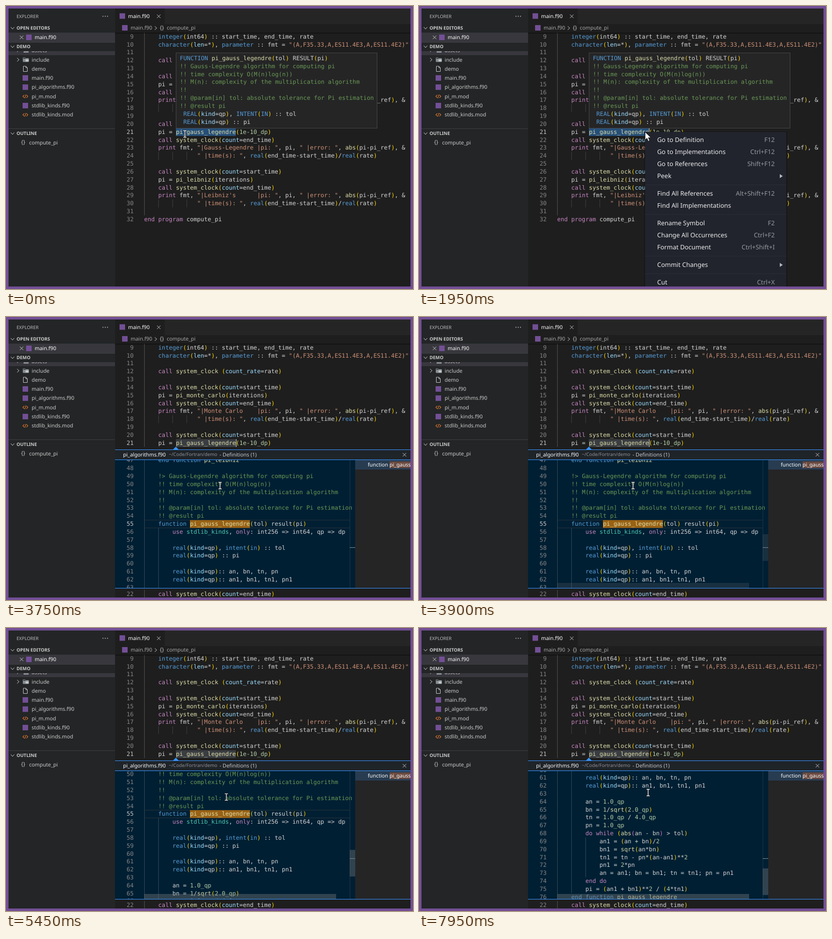
Recreate the animation shown at these times as an HTML page. Size 810 by 564 pixels, loop 8 s.

```html
<!DOCTYPE html>
<html lang="en">
<head>
<meta charset="utf-8">
<title>Peek definition</title>
<style>
html, body { margin: 0; width: 100%; height: 100%; overflow: hidden; background: #1e1e1e; }
svg { display: block; width: 810px; height: 564px; }
text { white-space: pre; text-rendering: geometricPrecision; }
.ui { font: 10.4px "Noto Sans", "Open Sans", sans-serif; }
.bold { font-weight: 700; }
.code { font: 11.67px "DejaVu Sans Mono", monospace; }
</style>
</head>
<body>
<script>
const NS = 'http://www.w3.org/2000/svg';
const LOOP = 8000, LINE = 15.83, COL = 7.026, LEFT = 275, BASE = 3.8;

function add(parent, tag, attrs = {}, content) {
  const el = document.createElementNS(NS, tag);
  for (const k in attrs) el.setAttribute(k, attrs[k]);
  if (content !== undefined) el.textContent = content;
  return parent.appendChild(el);
}
const group = (p, attrs) => add(p, 'g', attrs);
const rect = (p, x, y, width, height, fill, more) => add(p, 'rect', { x, y, width, height, fill, ...more });
const stroke = (p, d, color, width = 1) =>
  add(p, 'path', { d, fill: 'none', stroke: color, 'stroke-width': width });
const label = (p, x, cy, str, fill = '#cccccc', size = 10.4, more = {}) =>
  add(p, 'text', { class: 'ui', x, y: cy + size * 0.355, fill, style: `font-size:${size}px`, ...more }, str);
const cross = (p, x, y) => stroke(p, `M${x - 3.5} ${y - 3.5}l7 7m0-7l-7 7`, '#c5c5c5');
const chevron = (p, x, y, open) =>
  stroke(p, open ? `M${x - 3.5} ${y - 2}l3.5 4l3.5-4` : `M${x - 2} ${y - 3.5}l4 3.5l-4 3.5`, '#c5c5c5');
const show = (el, on) => el.setAttribute('display', on ? 'inline' : 'none');

// Syntax colouring
const TOKENS = [
  [/^!.*/, '#6a9955'],
  [/^"[^"]*"/, '#ce9178'],
  [/^\d[\d.]*(e-?\d+)?(_\w+)?/, '#b5cea8'],
  [/^(call|print|end program|use|only|do while|end do)\b/, '#c586c0'],
  [/^(integer|character|parameter|real|intent|in|end function|function)\b/i, '#569cd6'],
  [/^(kind|count|count_rate|len)(?==)/, '#9cdcfe'],
  [/^stdlib_kinds\b/, '#4ec9b0'],
  [/^(system_clock|pi_gauss_legendre|pi_monte_carlo|pi_leibniz|abs|sqrt)\b/, '#dcdcaa'],
  [/^\w+/, '#d4d4d4'],
  [/^[^\w!"()]+/, '#d4d4d4']
];
const BRACKETS = ['#ffd700', '#da70d6', '#179fff'];

function codeLine(p, x, cy, src) {
  const el = add(p, 'text', { class: 'code', y: cy + BASE });
  const body = src.trimStart();
  el.setAttribute('x', x + (src.length - body.length) * COL);
  let rest = body, depth = 0;
  while (rest) {
    let part, color;
    if (rest[0] === '(' || rest[0] === ')') {
      part = rest[0];
      if (part === ')') depth--;
      color = BRACKETS[Math.max(0, depth) % 3];
      if (part === '(') depth++;
    } else {
      const [re, c] = TOKENS.find(([re]) => re.test(rest));
      part = rest.match(re)[0];
      color = c;
    }
    add(el, 'tspan', { fill: color }, part);
    rest = rest.slice(part.length);
  }
}
function numbered(p, n, cy, src, active) {
  add(p, 'text', { class: 'code', x: 254, y: cy + BASE, 'text-anchor': 'end',
    fill: n === active ? '#c6c6c6' : '#858585' }, n);
  codeLine(p, LEFT, cy, src);
}

const MAIN = `    integer(int64) :: start_time, end_time, rate
    character(len=*), parameter :: fmt = "(A,F35.33,A,ES11.4E3,A,ES11.4E2)"

    call system_clock (count_rate=rate)

    call system_clock(count=start_time)
    pi = pi_monte_carlo(iterations)
    call system_clock(count=end_time)
    print fmt, "|Monte Carlo    |pi: ", pi, " |error: ", abs(pi-pi_ref), &
               " |time(s): ", real(end_time-start_time)/real(rate)

    call system_clock(count=start_time)
    pi = pi_gauss_legendre(1e-10_dp)
    call system_clock(count=end_time)
    print fmt, "|Gauss-Legendre |pi: ", pi, " |error: ", abs(pi-pi_ref), &
               " |time(s): ", real(end_time-start_time)/real(rate)

    call system_clock(count=start_time)
    pi = pi_leibniz(iterations)
    call system_clock(count=end_time)
    print fmt, "|Leibniz's      |pi: ", pi, " |error: ", abs(pi-pi_ref), &
               " |time(s): ", real(end_time-start_time)/real(rate)

end program compute_pi`.split('\n');

const PEEK = `    end function pi_leibniz

    !> Gauss-Legendre algorithm for computing pi
    !! time complexity O(M(n)log(n))
    !! M(n): complexity of the multiplication algorithm
    !!
    !! @param[in] tol: absolute tolerance for Pi estimation
    !! @result pi
    function pi_gauss_legendre(tol) result(pi)
        use stdlib_kinds, only: int256 => int64, qp => dp

        real(kind=qp), intent(in) :: tol
        real(kind=qp) :: pi

        real(kind=qp):: an, bn, tn, pn
        real(kind=qp):: an1, bn1, tn1, pn1

        an = 1.0_qp
        bn = 1/sqrt(2.0_qp)
        tn = 1.0_qp / 4.0_qp
        pn = 1.0_qp
        do while (abs(an - bn) > tol)
            an1 = (an + bn)/2
            bn1 = sqrt(an*bn)
            tn1 = tn - pn*(an-an1)**2
            pn1 = 2*pn
            an = an1; bn = bn1; tn = tn1; pn = pn1
        end do
        pi = (an1 + bn1)**2 / (4*tn1)
    end function pi_gauss_legendre
`.split('\n');

const HOVER = `FUNCTION pi_gauss_legendre(tol) RESULT(pi)
!! Gauss-Legendre algorithm for computing pi
!! time complexity O(M(n)log(n))
!! M(n): complexity of the multiplication algorithm
!!
!! @param[in] tol: absolute tolerance for Pi estimation
!! @result pi
 REAL(kind=qp), INTENT(IN) :: tol
 REAL(kind=qp) :: pi`.split('\n');

const svg = add(document.body, 'svg', { viewBox: '0 0 810 564' });
const defs = add(svg, 'defs');
function clip(id, x, y, w, h) {
  rect(add(defs, 'clipPath', { id }), x, y, w, h);
  return { 'clip-path': `url(#${id})` };
}
rect(svg, 0, 0, 810, 564, '#1e1e1e');

// Sidebar
const PURPLE = '#734f96';
const side = group(svg);
rect(side, 5, 5, 212, 554, '#232526');
const badge = (p, x, cy) => rect(p, x, cy - 5.5, 11, 11, PURPLE);
label(side, 21, 20.5, 'EXPLORER', '#bbbbbb', 9.1);
for (const x of [193, 197.5, 202]) add(side, 'circle', { cx: x, cy: 20.5, r: 0.9, fill: '#c5c5c5' });
function section(cy, name) {
  chevron(side, 13, cy, true);
  label(side, 21, cy, name, '#cccccc', 9.1, { class: 'ui bold' });
}
section(44, 'OPEN EDITORS');
rect(side, 5, 53, 212, 19, '#37373d');
cross(side, 31, 62.5);
badge(side, 40, 62.5);
label(side, 57, 62, 'main.f90', '#ffffff');

const row = group(side, clip('tree', 5, 90, 212, 140));
rect(row, 5, 80, 212, 18, '#37373d');
chevron(row, 24, 88, false);
rect(row, 35, 85, 10, 8, '#8a8f94');
label(row, 51, 88, 'assets');
const focusLine = rect(row, 5, 97, 212, 1.2, '#007fd4');
rect(side, 5, 72, 212, 1, '#3c3e3f');
section(81, 'DEMO');

chevron(side, 24, 107, false);
stroke(side, 'M34 103h4l1.5 1.5h5.5v6.5h-11z', '#8a8f94');
rect(side, 34, 105, 11, 6, '#8a8f94');
rect(side, 39, 106.5, 6, 4, '#c5c8ca');
label(side, 51, 107, 'include');
stroke(side, 'M34.5 120h5l3 3v7.5h-8zM39.5 120v3h3', '#c5c5c5');
label(side, 51, 125, 'demo');
['main.f90', 'pi_algorithms.f90', 'pi_m.mod', 'stdlib_kinds.f90', 'stdlib_kinds.mod'].forEach((name, i) => {
  const cy = 143.4 + i * 18.35;
  if (name.endsWith('f90')) badge(side, 33, cy);
  else stroke(side, `M36.5 ${cy - 3}l-3 3l3 3m4-6l3 3l-3 3m-1-6.5l-2 7`, '#e37933', 1.1);
  label(side, 51, cy, name);
});
rect(side, 5, 244, 212, 1, '#3c3e3f');
section(254, 'OUTLINE');
label(side, 30, 271.5, '{}', '#c5c5c5', 11);
label(side, 46, 272, 'compute_pi');

// Tab bar and breadcrumb
rect(svg, 217, 5, 588, 31, '#252526');
rect(svg, 217, 5, 99, 31, '#1e1e1e');
badge(svg, 226, 20);
label(svg, 243, 20, 'main.f90', '#ffffff');
cross(svg, 304, 20.5);
badge(svg, 231, 43.5);
label(svg, 248, 43.5, 'main.f90', '#a9a9a9');
chevron(svg, 298, 44, false);
label(svg, 306, 43, '{}', '#c5c5c5', 11);
label(svg, 320, 43.5, 'compute_pi', '#a9a9a9');

// Editor
const editor = group(svg, clip('editor', 217, 53, 588, 506));
const head = group(editor), tail = group(editor);
const wordMark = rect(head, 338, 243.5, 119.5, 15.5, '#264f78');
MAIN.forEach((src, i) => {
  const n = i + 9, cy = 61 + i * LINE, part = n < 22 ? head : tail;
  const levels = n === 32 ? 0 : /^ {12}/.test(src) ? 4 : 1;
  for (let k = 0; k < levels; k++)
    rect(part, LEFT + k * 4 * COL, cy - LINE / 2, 1, LINE + 0.1, k ? '#404040' : '#505050');
  numbered(part, n, cy, src, 21);
});
const caret = rect(head, 457.5, 243.5, 1.5, 15.5, '#aeafad');
rect(editor, 217, 53, 588, 2, '#000000', { opacity: 0.35 });

// Peek panel
const BLUE = '#3794ff';
const peek = group(editor);
rect(peek, 217, 264, 588, 277, '#1f2429');
add(peek, 'path', { d: 'M332 264.5l6-6l6 6z', fill: BLUE });
label(peek, 233, 274, 'pi_algorithms.f90', '#ffffff', 10.4);
label(peek, 324, 274, '~/Code/Fortran/demo', '#8f9194', 9.4);
label(peek, 425, 274, '- Definitions (1)', '#cccccc', 10.4);
cross(peek, 793, 274.5);
const inner = group(peek, clip('peek', 217, 285, 478, 255));
rect(inner, 217, 285, 478, 255, '#001f33');
const doc = group(inner);
const peekY = n => 301.5 + (n - 48) * LINE;
rect(doc, LEFT, peekY(55) - 8, 409, 1, '#28323a');
rect(doc, LEFT, peekY(55) + 7.5, 409, 1, '#28323a');
rect(doc, 366, peekY(55) - 7.5, 119.5, 15.5, '#996214');
PEEK.forEach((src, i) => {
  const n = i + 47, cy = peekY(n);
  const levels = n > 68 && n < 74 ? 3 : n > 55 && n < 76 ? 2 : 1;
  for (let k = 0; k < levels; k++)
    rect(doc, LEFT + k * 4 * COL, cy - LINE / 2, 1, LINE + 0.1, '#33495a');
  numbered(doc, n, cy, src, 55);
});
rect(inner, 684, 285, 1, 255, '#1d3546');
rect(inner, 684, 459, 11, 1, '#7f8f98');
const bars = group(inner);
const BAR = '#797979';
rect(bars, LEFT, 530, 382, 10, BAR, { opacity: 0.4 });
const slider = rect(bars, 684, 433, 11, 53, BAR, { opacity: 0.4 });
rect(peek, 695, 285, 110, 255, '#252526');
rect(peek, 695, 285, 110, 19, '#283c51');
rect(peek, 763.5, 288, 41.5, 13, '#6a4a40');
label(peek, 720, 294, 'function pi_gauss', '#ffffff');
for (const y of [264, 284, 540]) rect(peek, 217, y, 588, 1, BLUE);

// Hover card
const hover = group(svg);
rect(hover, 338.5, 93.5, 400, 150, '#252526', { stroke: '#454545' });
HOVER.forEach((src, i) => codeLine(hover, 346, 104 + i * 15.85, src));

// Context menu
const ITEMS = [
  [267, 'Go to Definition', 'F12'], [291, 'Go to Implementations', 'Ctrl+F12'],
  [315, 'Go to References', 'Shift+F12'], [339, 'Peek', '>'],
  [374, 'Find All References', 'Alt+Shift+F12'], [398, 'Find All Implementations', ''],
  [433, 'Rename Symbol', 'F2'], [457, 'Change All Occurrences', 'Ctrl+F2'],
  [481, 'Format Document', 'Ctrl+Shift+I'], [516, 'Commit Changes', '>'], [551, 'Cut', 'Ctrl+X']
];
const menu = group(svg, clip('menu', 440, 245, 300, 314));
rect(menu, 448, 250, 285, 320, '#000000', { opacity: 0.25 });
rect(menu, 450, 251, 281, 320, '#21242d');
const hot = rect(menu, 450, 326, 281, 24, '#735a96');
for (const y of [356, 415, 498, 533]) rect(menu, 450, y, 281, 1, '#292c35');
for (const [cy, name, keys] of ITEMS) {
  label(menu, 474, cy, name, '#eeeeee', 12.5);
  if (keys === '>') add(menu, 'path', { d: `M718 ${cy - 4}l6 4l-6 4z`, fill: '#b4b6ba' });
  else label(menu, 708, cy, keys, '#999ba1', 12.5, { 'text-anchor': 'end' });
}

// Pointers, both drawn around their hot spot
const arrow = add(svg, 'path', { d: 'M0 0v16l3.7-3.5l2.6 6l2.7-1.2l-2.6-5.8h5.2z',
  fill: '#ffffff', stroke: '#1a1a1a', 'stroke-width': 1 });
const beam = group(svg);
const BEAM = 'M-3-6.5h2.2l.8 .8l.8-.8h2.2M0-6v12M-3 6.5h2.2l.8-.8l.8 .8h2.2';
stroke(beam, BEAM, '#111111', 2.6);
stroke(beam, BEAM, '#ffffff', 1.3);

add(svg, 'rect', { x: 2.5, y: 2.5, width: 805, height: 559, fill: 'none', stroke: PURPLE, 'stroke-width': 5 });

// Timeline: pointer stops as [ms, x, y]
const POINTER = [
  [0, 356, 255], [900, 356, 255], [1550, 450, 251], [2000, 450, 251], [2550, 498, 333],
  [2950, 498, 333], [3400, 426, 336], [4250, 426, 336], [4500, 427, 335], [5250, 427, 335],
  [5800, 465, 341], [6750, 465, 341], [7550, 456, 328], [LOOP, 456, 328]
];
const WHEEL = [5350, 5500, 5650, 6050, 6900];
const NOTCH = 41.75;
const MENU_ON = 1750, PEEK_ON = 3500;

function pointerAt(t) {
  const i = POINTER.findIndex(k => k[0] > t);
  const [t0, x0, y0] = POINTER[i - 1], [t1, x1, y1] = POINTER[i];
  const u = (t - t0) / (t1 - t0), e = u * u * (3 - 2 * u);
  return [x0 + (x1 - x0) * e, y0 + (y1 - y0) * e];
}

function draw(t) {
  const [x, y] = pointerAt(t);
  const inMenu = t >= MENU_ON && t < PEEK_ON, peeking = t >= PEEK_ON;
  const place = `translate(${x} ${y})`;
  arrow.setAttribute('transform', place);
  beam.setAttribute('transform', place);
  show(arrow, inMenu);
  show(beam, !inMenu);
  show(menu, inMenu);
  show(hover, t < 2200);
  show(focusLine, t >= 2200 && t < PEEK_ON);
  show(peek, peeking);
  show(caret, t >= 1550 && t < 4250);
  wordMark.setAttribute('fill', peeking ? '#3a3d41' : '#264f78');
  tail.setAttribute('transform', `translate(0 ${peeking ? 285 : 0})`);

  const item = t > 2600 ? ITEMS[3] : ITEMS.find(([cy]) => Math.abs(cy - 1 - y) < 12);
  show(hot, item && (x > 452 || t > 2600));
  if (item) hot.setAttribute('y', item[0] - 13);

  const scroll = NOTCH * WHEEL.filter(w => t >= w).length;
  doc.setAttribute('transform', `translate(0 ${-scroll})`);
  slider.setAttribute('y', 433 + scroll * 0.221);
  bars.setAttribute('opacity', Math.min(1, Math.max(0, (t - 3850) / 100)));
}

const start = performance.now();
function tick() {
  draw((performance.now() - start) % LOOP);
  requestAnimationFrame(tick);
}
draw(0);
requestAnimationFrame(tick);
</script>
</body>
</html>
```
